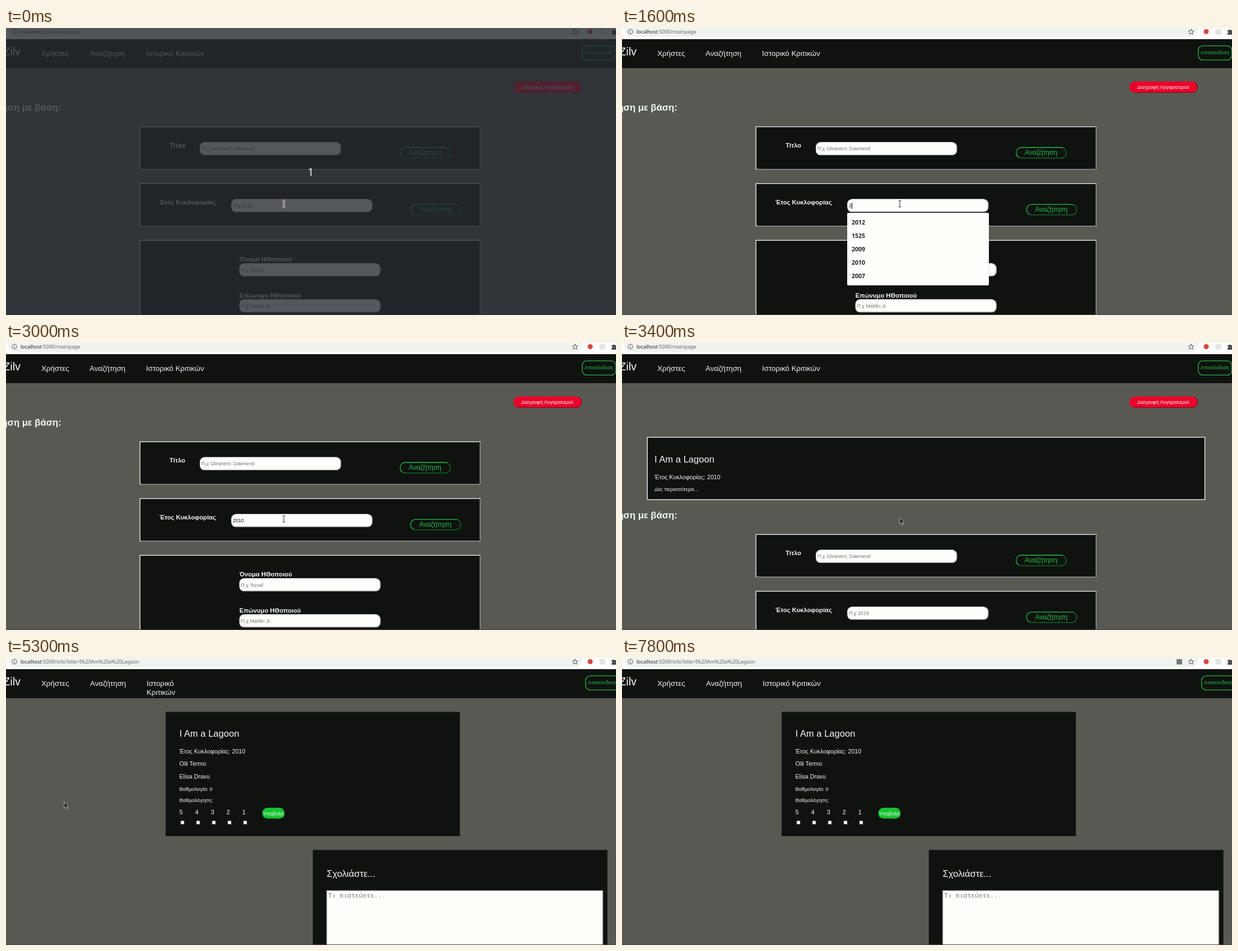
Write an HTML page that moves like this. It is 1089 px wide and 514 px high and loops after 8000 ms.

```html
<!DOCTYPE html>
<html lang="el">
<head>
<meta charset="utf-8">
<title>Movie search</title>
<style>
html, body { margin: 0; width: 100%; height: 100%; overflow: hidden; background: #595954; }
.stage { position: fixed; inset: 0; overflow: hidden; background: #595954; }
.stage * { animation: none 8s step-end infinite; }
.stage div, svg { position: absolute; box-sizing: border-box; }
svg, .scene, .search { left: 0; top: 0; width: 1089px; height: 514px; overflow: visible; }

/* type */
text { font: 10.64px "Liberation Sans", Arial, sans-serif; fill: #f1f6f8; white-space: pre; }
.nav text { font-size: 13.3px; }
.nav .logo { font-size: 20px; }
.title { font-size: 16.6px; }
.small { font-size: 9.3px; }
.tiny, .ph { font-size: 8.86px; }
.ph { fill: #757575; }
.rate { font-size: 11.3px; }
.label { font-size: 11.2px; font-weight: bold; }
.head { font-size: 16.6px; font-weight: bold; text-anchor: end; }
.green { fill: #22c04a; }
.find { font-size: 12px; }
.url { font: 8.95px "Noto Sans", "Open Sans", sans-serif; fill: #5f6368; }
.url tspan { fill: #202124; }
.mono { font: 11.45px "Noto Sans Mono", "DejaVu Sans Mono", monospace; fill: #757575; }
.count { font: 20px "Noto Sans", sans-serif; text-anchor: middle; fill: #eef2f6; }

/* boxes; the bevel gradients split each border along its diagonal */
.chrome { left: 0; top: 0; width: 1089px; height: 20px; background: #fefefe; }
.omni { left: 4px; top: -8px; width: 1024px; height: 24px; border-radius: 12px; background: #f0f2f0; }
.bar { left: 0; top: 20px; width: 1089px; height: 52px; background: #0f120f; }
.edge { left: 0; top: 513px; width: 1089px; height: 1px; background: #454145; }
rect { stroke-width: 1.33px; }
.panel { fill: #0f120f; }
.box { x: 239.2px; width: 607.2px; height: 76.2px; fill: #0f120f; stroke: url(#pale); }
.field { width: 251px; height: 22.3px; rx: 8px; fill: #fefefa; stroke: url(#soft); }
.btn { width: 89.6px; height: 18.9px; rx: 9px; fill: none; stroke: url(#leaf); }
.out { y: 31.8px; width: 60px; height: 25.6px; rx: 8.5px; fill: none; stroke: #22b848; }
.del { x: 906.7px; y: 96.4px; width: 120.6px; height: 18.9px; rx: 9px; fill: #eb0029; stroke: url(#rose); }
.send { x: 458.2px; y: 269px; width: 39px; height: 18.3px; rx: 8.5px; fill: #17c42e; stroke: url(#leaf); }
.area { x: 572.5px; y: 416.5px; width: 493px; height: 120px; fill: #fefefa; stroke: #888; }

/* year field */
.stage .typed { left: 405px; top: 313px; height: 11px; box-sizing: content-box; overflow: hidden; border-right: 1px solid transparent; font: 8.86px/11px "Liberation Sans", Arial, sans-serif; color: #111; animation-name: type; }
.popup { left: 402px; top: 331px; width: 253px; padding: 5px 0; border-radius: 2px; background: #fefefa; box-shadow: 0 1px 2px #0006; font: 600 10.5px/24px "Noto Sans", "Open Sans", sans-serif; color: #222; opacity: 0; animation-name: popup; }
.popup p { margin: 0; padding-left: 8px; height: 24px; overflow: hidden; }
.popup .no20 { animation-name: no20; }
.popup .no201 { animation-name: no201; }
.year { animation-name: year; }

/* scenes */
.main { animation-name: main; }
.info { opacity: 0; animation-name: info; }
.search { animation-name: shift; }
.result { opacity: 0; animation-name: result; }
.wrap { animation-name: wrap; }
.flat { opacity: 0; animation-name: flat; }
.lang { opacity: 0; animation-name: lang; }
.dim { inset: 0; background: rgba(39, 43, 50, .79); animation-name: dim; }
.count { animation-name: dim; }

/* pointer */
.move { transform: translate(496px, 315px); animation-name: move; }
.beam { animation-name: beam; }
.arrow { opacity: 0; animation-name: arrow; }
.hand { opacity: 0; animation-name: hand; }

@keyframes dim { 2.5%, 100% { opacity: 0; } }
@keyframes main { 65%, 100% { opacity: 0; } }
@keyframes info { 65%, 100% { opacity: 1; } }
@keyframes result { 41.25%, 100% { opacity: 1; } }
@keyframes shift { 41.25%, 100% { top: 165.6px; } }
@keyframes wrap { 67.5%, 100% { opacity: 0; } }
@keyframes flat { 67.5%, 100% { opacity: 1; } }
@keyframes lang { 68.75%, 100% { opacity: 1; } }
@keyframes year { 20% { opacity: 0; } 41.25%, 100% { opacity: 1; } }
@keyframes type {
  0% { width: 0; border-color: transparent; }
  5% { width: 0; border-color: #000; }
  12.5% { width: 0; border-color: transparent; }
  20% { width: 1ch; border-color: #000; }
  22.5% { width: 2ch; border-color: #000; }
  25% { width: 3ch; border-color: #000; }
  28.75% { width: 4ch; border-color: #000; }
  37.5% { width: 4ch; border-color: transparent; }
  41.25%, 100% { width: 0; border-color: transparent; }
}
@keyframes popup {
  5% { opacity: 1; transform: none; }
  30% { opacity: .58; transform: scale(.977); }
  31.25% { opacity: .2; transform: scale(.96); }
  33.75%, 100% { opacity: 0; transform: none; }
}
@keyframes no20 { 22.5%, 100% { height: 0; } }
@keyframes no201 { 25%, 100% { height: 0; } }
@keyframes beam { 42.5% { opacity: 0; } 83.75% { opacity: 1; } 85%, 100% { opacity: 0; } }
@keyframes arrow {
  42.5% { opacity: 1; } 58.75% { opacity: 0; }
  62.5% { opacity: 1; } 83.75% { opacity: 0; }
  85% { opacity: 1; } 97.5%, 100% { opacity: 0; }
}
@keyframes hand { 58.75% { opacity: 1; } 62.5%, 100% { opacity: 0; } }
@keyframes move {
  42.5% { transform: translate(496px, 313px); }
  43.75% { transform: translate(491px, 308px); }
  52.5% { transform: translate(440px, 303px); }
  53.75% { transform: translate(350px, 288px); }
  55% { transform: translate(250px, 268px); }
  56.25% { transform: translate(175px, 253px); }
  57.5% { transform: translate(130px, 250px); }
  58.75% { transform: translate(104px, 258px); }
  73.75% { transform: translate(101px, 257px); }
  75% { transform: translate(150px, 232px); }
  76.25% { transform: translate(260px, 190px); }
  77.5% { transform: translate(390px, 163px); }
  78.75% { transform: translate(490px, 160px); }
  80% { transform: translate(528px, 178px); }
  81.25% { transform: translate(470px, 203px); }
  82.5% { transform: translate(390px, 211px); }
  83.75% { transform: translate(322px, 208px); }
  85% { transform: translate(417px, 244px); }
  87.5% { transform: translate(350px, 225px); }
  88.75% { transform: translate(285px, 208px); }
  90% { transform: translate(384px, 219px); }
  95% { transform: translate(250px, 140px); }
  96.25%, 100% { transform: translate(9px, 38px); }
}
</style>
</head>
<body>
<div class="stage">
  <div class="chrome"></div>
  <div class="omni"></div>
  <div class="bar"></div>
  <svg>
    <defs>
      <linearGradient id="pale" x2="1" y2="1"><stop offset=".5" stop-color="#f0f0f0"/><stop offset=".5" stop-color="#a0a0a0"/></linearGradient>
      <linearGradient id="soft" x2="1" y2="1"><stop offset=".5" stop-color="#f4f4f0"/><stop offset=".5" stop-color="#a2a2a2"/></linearGradient>
      <linearGradient id="leaf" x2="1" y2="1"><stop offset=".5" stop-color="#1fc04a"/><stop offset=".5" stop-color="#10772c"/></linearGradient>
      <linearGradient id="rose" x2="1" y2="1"><stop offset=".5" stop-color="#eb0029"/><stop offset=".5" stop-color="#9c001c"/></linearGradient>
    </defs>
    <g fill="none" stroke="#4a4d51">
      <circle cx="15" cy="6.5" r="4.3"/>
      <path d="M15 6v3.2M15 3.8v1.2"/>
      <path d="M1016 2l1.4 3.1 3.4.4-2.5 2.3.7 3.3-3-1.7-3 1.7.7-3.3-2.5-2.3 3.4-.4z"/>
    </g>
    <circle cx="1043" cy="6.5" r="4.5" fill="#d8473c"/>
    <rect x="1059.5" y="2" width="10" height="9.5" rx="1" fill="#e3e3e3"/>
    <path d="M1081 4h2.5a1.5 1.5 0 0 1 3 0h3v8h-8.5v-3a1.5 1.5 0 0 0 0-3z" fill="#4a4d51"/>
  </svg>

  <div class="scene main">
    <svg>
      <rect class="out" x="1028.7"/>
      <rect class="del"/>
      <text class="url" x="26" y="9.7"><tspan>localhost</tspan>:5000/mainpage</text>
      <g class="nav">
        <text class="logo" x="-5" y="49">Zilv</text>
        <text x="63" y="50">Χρήστες</text>
        <text x="149" y="50">Αναζήτηση</text>
        <text x="250" y="50">Ιστορικό Κριτικών</text>
      </g>
      <text class="tiny green" x="1033" y="47.3">Αποσύνδεση</text>
      <text class="tiny" x="920" y="109">Διαγραφή Λογαριασμού</text>
    </svg>

    <svg class="result">
      <rect class="panel" x="45.2" y="168.9" width="995.3" height="111.6" stroke="#f4f4f4"/>
      <text class="title" x="58" y="213.5">I Am a Lagoon</text>
      <text x="58" y="244">Έτος Κυκλοφορίας: 2010</text>
      <text class="small" x="58" y="265.2">Δες περισσότερα...</text>
    </svg>

    <svg class="search">
      <rect class="box" y="176.9"/>
      <rect class="box" y="278.6"/>
      <rect class="box" y="380.3" style="height:240px"/>
      <rect class="field" x="346.7" y="205"/>
      <rect class="field" x="402.8" y="306.8"/>
      <rect class="field" x="417.2" y="421.9"/>
      <rect class="field" x="417.2" y="486.5"/>
      <rect class="btn" x="703.7" y="214"/>
      <rect class="btn" x="722.3" y="315.8"/>
      <text class="head" x="98.7" y="147.8">Αναζήτηση με βάση:</text>
      <text class="label" x="292" y="214.2">Τίτλο</text>
      <text class="label" x="273.5" y="316.2">Έτος Κυκλοφορίας</text>
      <text class="label" x="416.7" y="418">Όνομα ΗΘοποιού</text>
      <text class="label" x="416.7" y="482.7">Επώνυμο ΗΘοποιού</text>
      <text class="ph" x="349" y="219.3">Π.χ Gleaners: Dawnend</text>
      <text class="ph year" x="405" y="321.3">Π.χ 2019</text>
      <text class="ph" x="419.5" y="436.8">Π.χ Torvel</text>
      <text class="ph" x="419.5" y="501">Π.χ Maldin Jr.</text>
      <text class="find green" x="719" y="227.3">Αναζήτηση</text>
      <text class="find green" x="737.5" y="329">Αναζήτηση</text>
    </svg>
    <div class="typed">2010</div>
    <div class="popup">
      <p>2012</p>
      <p class="no20">1525</p>
      <p class="no201">2009</p>
      <p>2010</p>
      <p class="no201">2007</p>
    </div>
  </div>

  <svg class="info">
    <rect class="out" x="1034.7"/>
    <rect class="panel" x="285" y="96.5" width="525.3" height="222.5"/>
    <rect class="panel" x="547.7" y="343.7" width="526" height="200"/>
    <rect class="send"/>
    <rect class="area"/>
    <text class="url" x="26" y="9.7"><tspan>localhost</tspan>:5000/info?title=I%20Am%20a%20Lagoon</text>
    <rect class="lang" x="990" y="2" width="10" height="9.5" fill="#74777a"/>
    <g class="nav">
      <text class="logo" x="-5" y="49">Zilv</text>
      <text x="63" y="50">Χρήστες</text>
      <text x="150" y="50">Αναζήτηση</text>
      <g class="wrap">
        <text x="251" y="50">Ιστορικό</text>
        <text x="251" y="65.5">Κριτικών</text>
      </g>
      <text class="flat" x="251" y="50">Ιστορικό Κριτικών</text>
    </g>
    <text class="tiny green" x="1039" y="47.3">Αποσύνδεση</text>
    <text class="title" x="309.5" y="140.5">I Am a Lagoon</text>
    <text x="309.5" y="170.8">Έτος Κυκλοφορίας: 2010</text>
    <text x="309.5" y="193.3">Olli Termo</text>
    <text x="309.5" y="216">Elisa Dravu</text>
    <text class="small" x="309.5" y="238">Βαθμολογία: 0</text>
    <text class="small" x="309.5" y="257.5">Βαθμολόγηση:</text>
    <text class="rate" x="309.5 337.5 365.5 393.5 421.5" y="280">54321</text>
    <g fill="none">
      <path d="M311.7 294.6H431" stroke="#777" stroke-width="6.6" stroke-dasharray="6.6 21.4"/>
      <path d="M312.4 294.6H430" stroke="#fefefe" stroke-width="5.2" stroke-dasharray="5.2 22.8"/>
    </g>
    <text class="tiny" x="459.5" y="281.7">Υποβολή</text>
    <text class="title" x="572.5" y="392">Σχολιάστε...</text>
    <text class="mono" x="575" y="429">Τι πιστεύετε...</text>
  </svg>

  <div class="edge"></div>
  <div class="dim"></div>
  <svg>
    <text class="count" x="544" y="265">1</text>
    <g class="move" stroke-linejoin="round">
      <g class="beam" fill="none">
        <path d="M-2.5-5.5H2.5M0-5.5V5.5M-2.5 5.5H2.5" stroke="#fff" stroke-width="2.6"/>
        <path d="M-2.5-5.5H2.5M0-5.5V5.5M-2.5 5.5H2.5" stroke="#333"/>
      </g>
      <path class="arrow" d="M0 0V11l2.6-2.3 1.8 4 1.8-.8-1.8-3.8H7.6Z" fill="#111" stroke="#ddd" stroke-width=".8"/>
      <path class="hand" d="M-2 1.5q1-1 2 0V6l5 1q1.5.4 1.3 2L5.5 13.5H-1.5L-5.5 9q0-1.5 1.5-1l2 1.5Z" fill="#111" stroke="#ddd" stroke-width=".8"/>
    </g>
  </svg>
</div>
</body>
</html>
```
